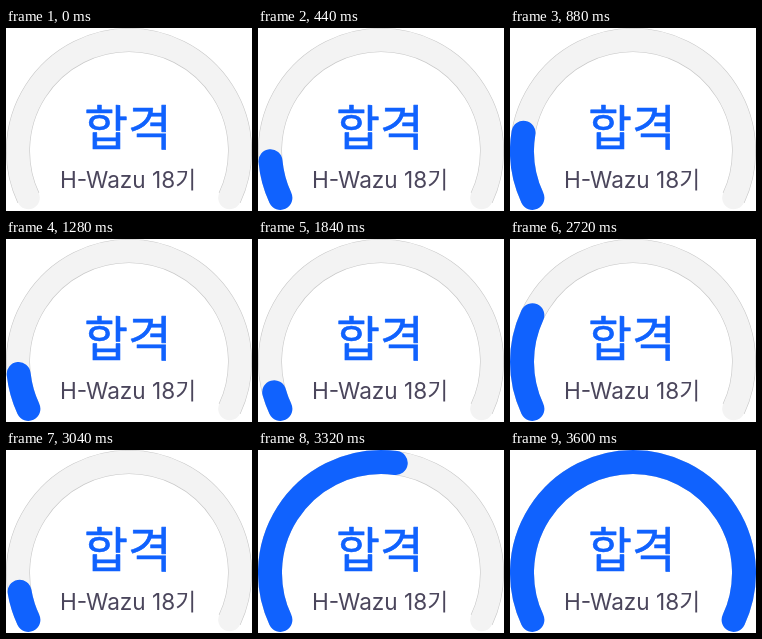
These frames come from a looping animation (246x183 px, 4200 ms). An HTML page:

```html
<!DOCTYPE html>
<html lang="ko">
<head>
<meta charset="utf-8">
<title>Gauge</title>
<style>
  html, body { margin: 0; width: 100%; height: 100%; overflow: hidden; background: #fff; }
  svg { display: block; width: 246px; height: 183px; }
  path { fill: none; stroke-linecap: round; }
  .edge { stroke-linecap: butt; }
  text { text-anchor: middle; }
  .title {
    font: 500 47.5px "Noto Sans CJK KR", "Noto Sans CJK", sans-serif;
    fill: #1062fe; stroke: #1062fe; stroke-width: .6; stroke-linejoin: round;
  }
  .label { font: 400 22.6px Inter, "Noto Sans CJK KR", "Noto Sans CJK", sans-serif; fill: #4b465c; }
</style>
</head>
<body>
<svg viewBox="0 0 246 183">
  <path class="arc edge" stroke="#c8c8c8" stroke-width="24"/>
  <path class="arc" stroke="#f3f3f3" stroke-width="22.8"/>
  <path class="arc" id="bar" stroke="#1062fe" stroke-width="24" pathLength="100"/>
  <text class="title" x="122" y="117.2">합격</text>
  <text class="label" x="122" y="159.5">H-Wazu 18기</text>
</svg>
<script>
  const LOOP = 4200, STEP = 40;
  const CX = 123, CY = 123, R = 111, DROP = 25 * Math.PI / 180;

  // [time in ms, percent filled], linear in between
  const KEYS = [[0, 0], [820, 16], [1760, 0], [1800, 0], [2400, 60.3],
                [2900, 0], [3000, 0], [3600, 100], [LOOP, 100]];

  const dx = R * Math.cos(DROP), y = CY + R * Math.sin(DROP);
  const d = `M${CX - dx} ${y}A${R} ${R} 0 1 1 ${CX + dx} ${y}`;
  document.querySelectorAll('.arc').forEach(p => p.setAttribute('d', d));

  const bar = document.getElementById('bar');

  function level(t) {
    const i = KEYS.findIndex(k => k[0] > t);
    const [t0, v0] = KEYS[i - 1], [t1, v1] = KEYS[i];
    return v0 + (v1 - v0) * (t - t0) / (t1 - t0);
  }

  function draw(ms) {
    const t = Math.floor((ms % LOOP) / STEP) * STEP;
    const v = level(t);
    bar.style.visibility = v > 0 ? 'visible' : 'hidden';
    bar.setAttribute('stroke-dasharray', `${v} 300`);
  }

  const start = performance.now();
  function tick() {
    draw(performance.now() - start);
    requestAnimationFrame(tick);
  }
  tick();
</script>
</body>
</html>
```
